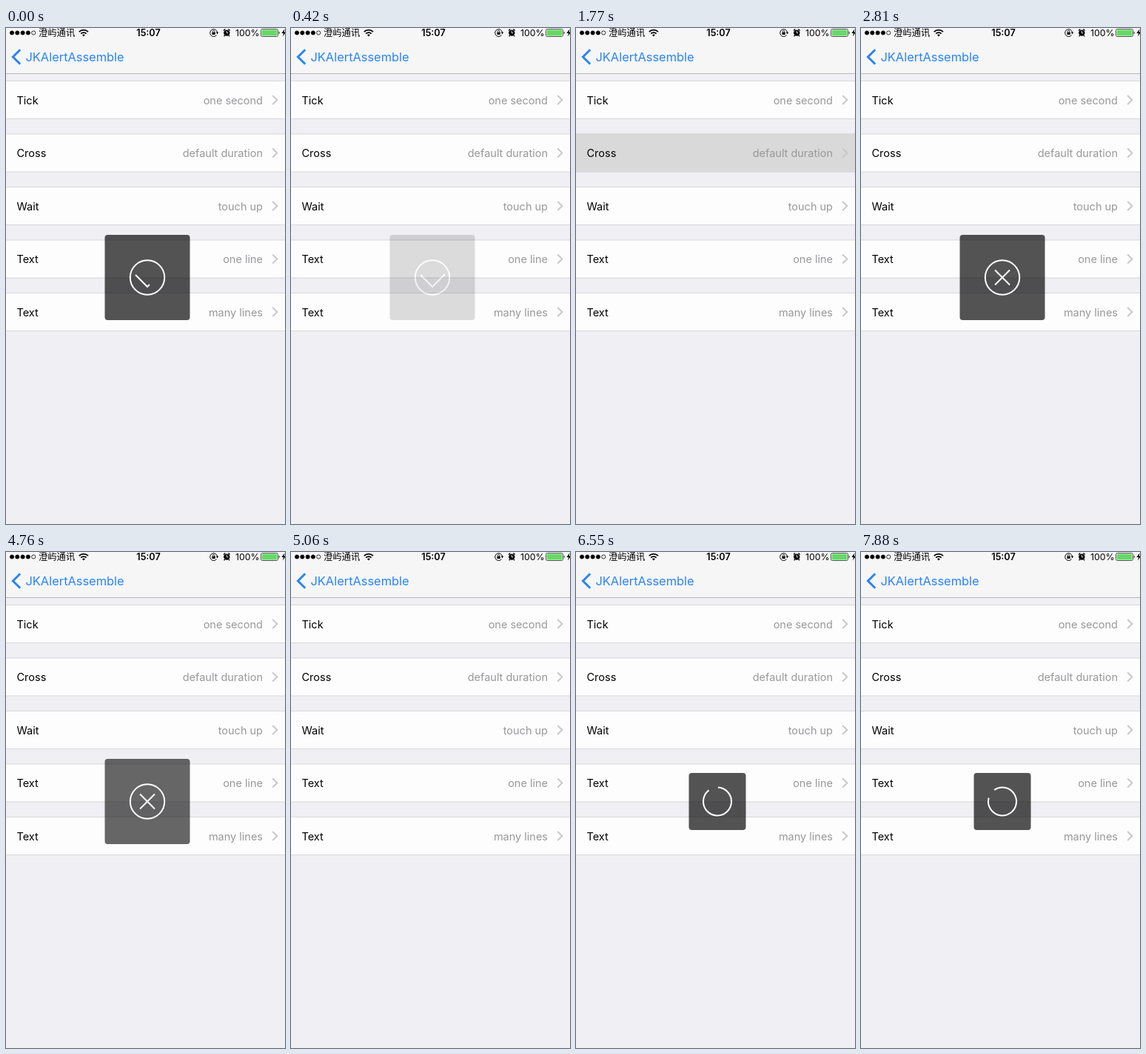
Write an HTML page that moves like this. It is 377x669 px and loops after 8 s.

```html
<!DOCTYPE html>
<html lang="en">
<head>
<meta charset="utf-8">
<title>JKAlertAssemble</title>
<style>
  html, body { margin: 0; width: 100%; height: 100%; overflow: hidden; background: #efeff4; }
  svg { display: block; width: 377px; height: 669px; }
  text { font: 14.5px Inter, "Noto Sans", sans-serif; }
  .status { font-size: 12.3px; }
  .line { fill: none; stroke: #fff; stroke-width: 2; }
</style>
</head>
<body>
<svg viewBox="0 0 377 669">
  <rect width="377" height="61" fill="#f6f6f7"/>
  <rect y="61" width="377" height="1" fill="#b9b9bc"/>

  <!-- status bar -->
  <g id="signal" stroke="#000" stroke-width=".8"></g>
  <text class="status" x="44" y="11" style="font-family:'Noto Sans CJK SC','Noto Sans CJK',sans-serif">澄屿通讯</text>
  <g fill="none" stroke="#000" stroke-width="1.8">
    <path d="M98.8 5.2a8.6 8.6 0 0 1 12.2 0M101.2 7.7a5.2 5.2 0 0 1 7.4 0"/>
    <path d="M104.9 11.4l-1.9-2a2.8 2.8 0 0 1 3.8 0z" fill="#000" stroke="none"/>
  </g>
  <text class="status" x="192.5" y="11" text-anchor="middle" style="font-size:12.6px;font-weight:600">15:07</text>
  <path d="M284.5 9.6a4.9 4.9 0 1 1 1-3.4" fill="none" stroke="#000"/>
  <path d="M283.7 5.8h3.6l-1.8 2.5zM278.5 5.8h4.2v3.2h-4.2z"/>
  <path d="M279.3 6V4.8a1.3 1.3 0 0 1 2.6 0V6" fill="none" stroke="#000" stroke-width=".8"/>
  <circle cx="298.3" cy="6.6" r="4.2"/>
  <path d="M294 3.6l2.2-2M302.6 3.6l-2.2-2M295.6 10l-1 1.2M301 10l1 1.2" stroke="#000" stroke-width="1.4"/>
  <path d="M298.3 4v2.8h2" fill="none" stroke="#fff" stroke-width=".9"/>
  <text class="status" x="310" y="11">100%</text>
  <rect x="344.5" y="1.5" width="23" height="10" rx="1.8" fill="#fff" stroke="#444" stroke-width=".9"/>
  <rect x="345.6" y="2.6" width="20.8" height="7.8" rx=".8" fill="#66d966"/>
  <path d="M368.6 4.6q1.4.6 1.4 1.9t-1.4 1.9z" fill="#444"/>
  <path d="M376.6 1.2l-4.2 5.8h2.6l-1 4.4 4-6h-2.4z"/>

  <!-- navigation bar -->
  <path d="M19.2 29.3L9.4 39l9.8 9.7" fill="none" stroke="#2a84f6" stroke-width="3"/>
  <text x="26.5" y="45" fill="#2a84f6" style="font-size:16.4px">JKAlertAssemble</text>

  <g id="rows"></g>

  <g id="alert" transform="translate(191 336.5)">
    <rect id="panel" rx="4" fill="#000" fill-opacity=".67"/>
    <g id="tick" class="line">
      <path d="M0-23.2A23.2 23.2 0 1 1 0 23.2A23.2 23.2 0 1 1 0-23.2"/>
      <path d="M-16-3.5L0 12.5L17-4.5"/>
    </g>
    <g id="cross" class="line">
      <path d="M0-23.2A23.2 23.2 0 1 1 0 23.2A23.2 23.2 0 1 1 0-23.2"/>
      <path d="M-10-10L10 10"/>
      <path d="M10-10L-10 10"/>
    </g>
    <circle id="wait" class="line" r="19" pathLength="360" stroke-dasharray="320 40"/>
  </g>
</svg>
<script>
const LOOP = 8000, STEP = 148.2, FADE = 300, DRAW = 900, TURN = 704;
const $ = id => document.getElementById(id);

$('signal').innerHTML = [0, 1, 2, 3, 4].map(i =>
  `<circle cx="${8 + i * 7.3}" cy="6.5" r="2.6" fill="${i < 4 ? '#000' : 'none'}"/>`).join('');

$('rows').innerHTML = [
  ['Tick', 'one second'], ['Cross', 'default duration'], ['Wait', 'touch up'],
  ['Text', 'one line'], ['Text', 'many lines']
].map(([name, detail], i) => `<g transform="translate(0 ${71 + 71.5 * i})">
  <rect width="377" height="52" fill="#d8d8db"/>
  <rect y="1" width="377" height="50" fill="#fdfdfd"/>
  <rect class="glow" width="377" height="52" fill="#d9d9d9" opacity="0"/>
  <text x="14.5" y="31.5">${name}</text>
  <text x="347" y="31.5" text-anchor="end" fill="#98989b">${detail}</text>
  <path d="M360.2 20l6.2 6-6.2 6" fill="none" stroke="#c7c7cc" stroke-width="1.9"/></g>`).join('');
const glows = document.querySelectorAll('.glow');

// show/hide: start of the fades; draw: start of the stroke
const alerts = [
  { id: 'tick', size: 115, show: -900, draw: -807, hide: 203 },
  { id: 'cross', size: 115, row: 1, touch: 1770, show: 1820, draw: 1900, hide: 4697 },
  { id: 'wait', size: 77, row: 2, touch: 5360, show: 5410, hide: 9000 }
];

const clamp = v => Math.min(1, Math.max(0, v));
const ease = v => (v = clamp(v), v * v * (3 - 2 * v));

function snap(t) {
  const start = [5360, 4760, 1770, 120, 0].find(s => s <= t);
  return start + Math.floor((t - start) / STEP) * STEP;
}

function drawStroke(group, progress) {
  const paths = [...group.children], lengths = paths.map(p => p.getTotalLength());
  let left = progress * lengths.reduce((a, b) => a + b);
  paths.forEach((p, i) => {
    p.style.visibility = left > 0 ? 'visible' : 'hidden';
    p.setAttribute('stroke-dasharray', `${Math.max(0, left)} 999`);
    left -= lengths[i];
  });
}

function render(t) {
  let current = null;
  for (const a of alerts) {
    if (t >= a.show && t < a.hide + FADE) current = a;
    if (a.row) glows[a.row].setAttribute('opacity',
      t < a.touch ? 0 : 1 - ease((t - a.show) / 450));
  }
  $('alert').style.display = current ? '' : 'none';
  if (!current) return;

  const { id, size, show, hide, draw } = current;
  $('alert').setAttribute('opacity', ease((t - show) / FADE) - ease((t - hide) / FADE));
  for (const a of alerts) $(a.id).style.display = a.id === id ? '' : 'none';
  for (const k of ['width', 'height']) $('panel').setAttribute(k, size);
  for (const k of ['x', 'y']) $('panel').setAttribute(k, -size / 2);

  if (id === 'wait') $('wait').setAttribute('transform', `rotate(${275 + (t - 6550) / TURN * 360})`);
  else drawStroke($(id), clamp((t - draw) / DRAW));
}

const began = performance.now();
(function frame() {
  render(snap((performance.now() - began) % LOOP));
  requestAnimationFrame(frame);
})();
</script>
</body>
</html>
```
